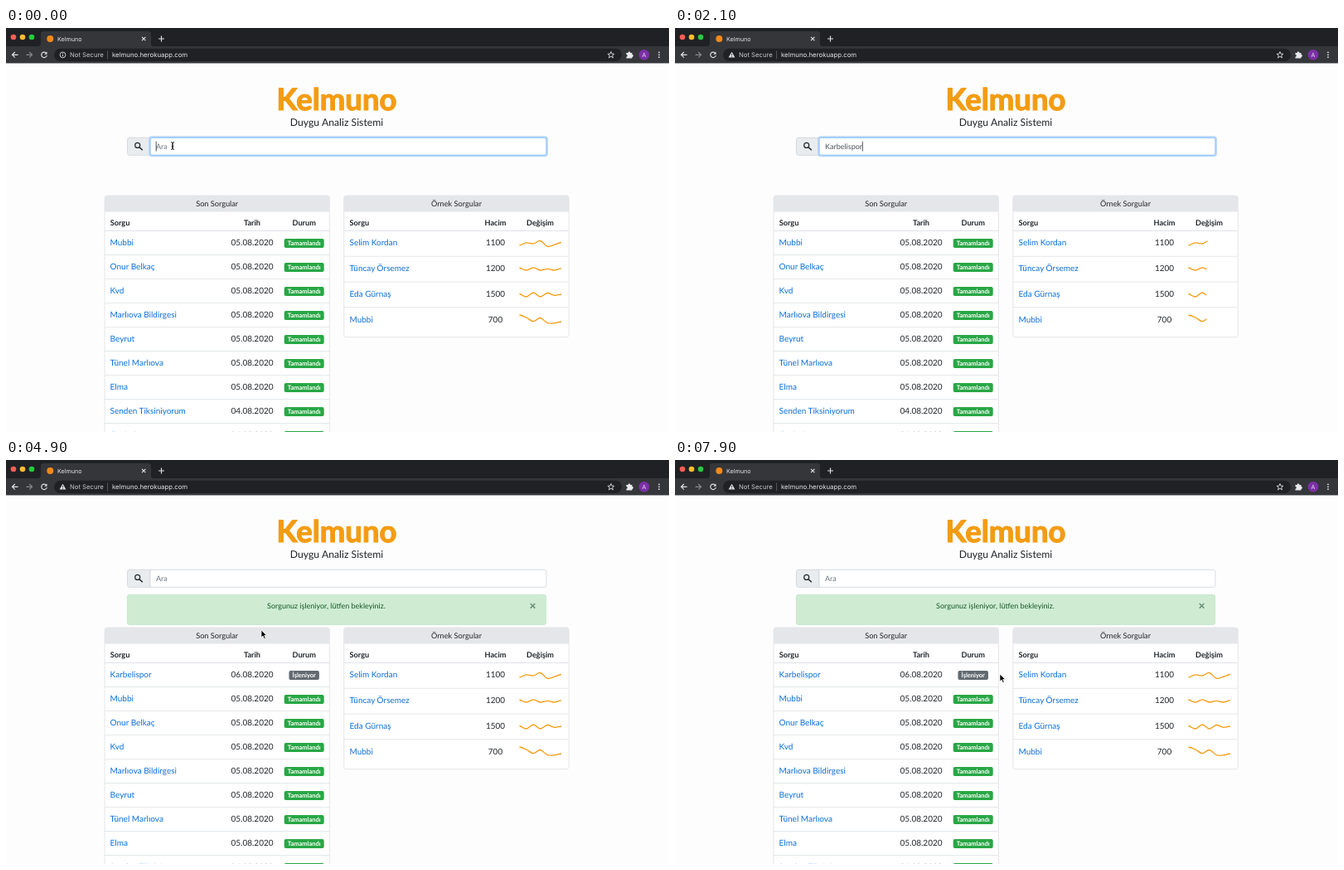
These frames come from a looping animation (800 by 487 pixels, 8000 ms). An HTML page:

```html
<!DOCTYPE html>
<html lang="tr">
<head>
<meta charset="utf-8">
<title>Kelmuno</title>
<style>
  html, body { margin: 0; width: 100%; height: 100%; overflow: hidden; background: #fdfdfd; }
  svg { display: block; }
  text { font-family: Lato, "Open Sans", sans-serif; font-size: 10px; fill: #212529; text-rendering: geometricPrecision; }
  .ui text { font-family: Inter, Roboto, sans-serif; font-size: 7.6px; fill: #e4e6e9; }
  .mid { text-anchor: middle; }
  text.small { font-size: 9.2px; }
  text.th { font-size: 9.2px; font-weight: 700; }
  text.link { fill: #0a6fdc; }
  text.badge { font-size: 7.5px; font-weight: 700; fill: #fff; text-anchor: middle; }
  text.field { font-size: 9px; fill: #495057; }
  .rule { stroke: #dee2e6; stroke-width: .8; }
  .icon { fill: none; stroke: #dfe1e5; stroke-width: 1.2; }
  .spark { fill: none; stroke: #f39c12; stroke-width: 1.3; }
</style>
</head>
<body>
<svg width="800" height="487" viewBox="0 0 800 487">
  <rect width="800" height="487" fill="#fdfdfd"/>

  <g class="ui">
    <rect width="800" height="42.5" fill="#35363a"/>
    <path d="M0 0H800V22H178Q175 22 175 18V7Q175 4 172 4H45Q42 4 42 7V18Q42 22 39 22H0Z" fill="#202124"/>
    <circle cx="9" cy="11" r="3.3" fill="#fe5f57"/>
    <circle cx="20" cy="11" r="3.3" fill="#febc2e"/>
    <circle cx="31" cy="11" r="3.3" fill="#28c840"/>
    <circle cx="53.3" cy="13" r="4" fill="#f08a1c"/>
    <text x="62" y="15.6" style="font-size:7.2px">Kelmuno</text>
    <path class="icon" d="M164 10.8l4.4 4.4m0-4.4l-4.4 4.4M184 13h7m-3.500-3.500v7"/>

    <path class="icon" d="M14.500 32.300H7.500m3.300-3.300L7.500 32.300l3.300 3.300"/>
    <path class="icon" style="stroke:#85878b" d="M24.500 32.300h7m-3.300-3.300l3.300 3.300l-3.300 3.300"/>
    <path class="icon" d="M48.800 30.500A3.300 3.300 0 1 0 49.300 33"/>
    <path d="M49.500 28.500v3.200h-3.200z" fill="#dfe1e5"/>

    <rect x="58" y="24.800" width="685" height="15.200" rx="7.600" fill="#202124"/>
    <g id="info" class="icon" style="stroke-width:.9">
      <circle cx="68.500" cy="32.400" r="3.400"/>
      <path d="M68.500 31.800v2.500m0-4.100v.9"/>
    </g>
    <g id="warn">
      <path d="M68.500 28.700l3.900 6.900h-7.800z" fill="#dfe1e5"/>
      <path d="M68.500 31v2.300m0 .7v.9" stroke="#202124" stroke-width=".8"/>
    </g>
    <text x="77" y="35.200" style="font-size:7.700px;fill:#c5c8cc">Not Secure</text>
    <path d="M122.500 27.500v10" stroke="#5f6368" stroke-width=".8"/>
    <text x="128" y="35.200" style="font-size:7.800px">kelmuno.herokuapp.com</text>

    <path class="icon" style="stroke-width:.9" d="M730 28.500l1.100 2.600 2.800.2-2.200 1.800.8 2.800-2.500-1.600-2.500 1.600.8-2.800-2.200-1.800 2.800-.2z"/>
    <path d="M748.500 30h2.100a1.400 1.400 0 0 1 2.800 0h2.100v2.100a1.400 1.400 0 0 1 0 2.800v1.600h-7v-1.800a1.300 1.300 0 0 0 0-2.600z" fill="#e8eaed"/>
    <circle cx="770" cy="32.300" r="6.300" fill="#7b2fa8"/>
    <text class="mid" x="770" y="34.900" style="font-size:7px">A</text>
    <g fill="#dfe1e5"><circle cx="788" cy="29.400" r=".9"/><circle cx="788" cy="32.300" r=".9"/><circle cx="788" cy="35.200" r=".9"/></g>
  </g>

  <text class="mid" x="399" y="98.800" style="font-size:36.500px;font-weight:700;fill:#f39c12;stroke:#f39c12;stroke-width:1.200px;stroke-linejoin:round">Kelmuno</text>
  <text class="mid" x="399" y="118" style="font-size:12.250px">Duygu Analiz Sistemi</text>

  <path d="M174 132.300H149q-2.500 0-2.500 2.500v16q0 2.500 2.500 2.500h25z" fill="#e9ecef" stroke="#ced4da" stroke-width=".8"/>
  <g fill="none" stroke="#212529"><circle cx="158.700" cy="141.400" r="3" stroke-width="1.200"/><path d="M161 143.700l3.800 3.600" stroke-width="1.500"/></g>
  <path d="M174 132.300h475.500q2.500 0 2.500 2.500v16q0 2.500-2.500 2.500H174z" fill="#fff" stroke="#ced4da" stroke-width=".8"/>
  <g id="ring" fill="none">
    <rect x="173" y="131.300" width="480" height="23" rx="3" stroke="#b9d9fb" stroke-width="2"/>
    <rect x="174" y="132.300" width="478" height="21" rx="2.500" stroke="#80bdff" stroke-width=".8"/>
  </g>
  <text id="hint" class="field" x="181" y="145.600" style="fill:#6c757d">Ara</text>
  <text id="query" class="field" x="181" y="145.600"></text>
  <path id="caret" d="M0 136.800v11.800" stroke="#212529" stroke-width=".8"/>

  <g id="alert">
    <rect x="146.400" y="162.400" width="505.200" height="36" rx="2.500" fill="#cfecd3" stroke="#c0e4c8" stroke-width=".8"/>
    <text class="mid" x="386.500" y="179" style="font-size:9px;fill:#155724">Sorgunuz işleniyor, lütfen bekleyiniz.</text>
    <path d="M632.800 173l5.600 5.600m0-5.600l-5.600 5.600" stroke="#6f8f78" stroke-width="1.500"/>
  </g>

  <g id="cards"></g>
  <g id="list"></g>
  <g id="samples"></g>

  <g id="arrow"><path d="M0 0v9l2.100-1.900 1.500 3.300 1.600-.7-1.500-3.200h2.800z" fill="#000" stroke="#fff" stroke-width=".7"/></g>
  <g id="beam" fill="none">
    <path id="beamPath" d="M-2-4.500q2 0 2 1.500v6q0 1.500-2 1.500M2-4.500q-2 0-2 1.500v6q0 1.500 2 1.500" stroke="#fff" stroke-width="2"/>
    <path d="M-2-4.500q2 0 2 1.500v6q0 1.500-2 1.500M2-4.500q-2 0-2 1.500v6q0 1.500 2 1.500M-1.200.8h2.400" stroke="#111" stroke-width=".9"/>
  </g>
</svg>

<script>
const $ = id => document.getElementById(id);
const LOOP = 8000, STEP = 100;
const WORD = 'Karbelispor';
const KEYS = [500, 600, 700, 800, 900, 1000, 1200, 1300, 1400, 1500, 1700];
const SUBMIT = 2150, ROW_IN = 3050, DRAW = 1500;
const ROW = 29;

const text = (x, y, cls, s) => `<text class="${cls}" x="${x}" y="${y}">${s}</text>`;
const rule = (x, y, w = .8) => `<path class="rule" style="stroke-width:${w}" d="M${x} ${y}h271"/>`;

function card(x, bottom, title, heads) {
  return `<rect x="${x}" y="202" width="271.400" height="${bottom - 202}" rx="3" fill="#fff" stroke="#dfe0e2" stroke-width=".8"/>
    <path d="M${x} 221.500V205q0-3 3-3h265.400q3 0 3 3v16.500z" fill="#e5e6ea"/>` +
    text(x + 135.700, 214.500, 'small mid', title) +
    text(x + 6.700, 238, 'th', heads[0]) +
    heads.slice(1).map(([cx, s]) => text(cx, 238, 'th mid', s)).join('') +
    rule(x, 244.500, 1.200);
}
$('cards').innerHTML =
  card(119, 520, 'Son Sorgular', ['Sorgu', [297, 'Tarih'], [359.700, 'Durum']]) +
  card(407.800, 372.700, 'Örnek Sorgular', ['Sorgu', [590.500, 'Hacim'], [644.500, 'Değişim']]);

function listRow(name, date, i) {
  const busy = i < 0, y = 259 + i * ROW, w = busy ? 36.500 : 48;
  return `<g ${busy ? 'id="fresh"' : ''}>` +
    (busy ? `<rect id="hover" x="119.400" y="${y - 14}" width="270.600" height="28.400" fill="#dff2fd"/>` : '') +
    text(125.600, y + 3.400, 'link', name) +
    text(297, y + 3.400, 'mid', date + '.08.2020') +
    `<rect x="${359.700 - w / 2}" y="${y - 4.900}" width="${w}" height="11" rx="2" fill="${busy ? '#626a71' : '#28a745'}"/>` +
    text(359.700, y + 3.300, 'badge', busy ? 'İşleniyor' : 'Tamamlandı') +
    rule(119, y + 14.500) + '</g>';
}
const names = ['Mubbi', 'Onur Belkaç', 'Kvd', 'Marlıova Bildirgesi', 'Beyrut',
  'Tünel Marlıova', 'Elma', 'Senden Tiksiniyorum', 'Geçinti'];
$('list').innerHTML = listRow(WORD, '06', -1) +
  names.map((n, i) => listRow(n, i < 7 ? '05' : '04', i)).join('');

// Catmull-Rom curve through evenly spaced heights
function curve(ys) {
  const dx = 50.500 / (ys.length - 1), X = i => 619.500 + i * dx;
  const at = i => ys[Math.max(0, Math.min(ys.length - 1, i))];
  let d = `M${X(0)} ${ys[0]}`;
  for (let i = 0; i < ys.length - 1; i++) {
    const a = at(i) + (at(i + 1) - at(i - 1)) / 6;
    const b = at(i + 1) - (at(i + 2) - at(i)) / 6;
    d += `C${X(i) + dx / 3} ${a} ${X(i + 1) - dx / 3} ${b} ${X(i + 1)} ${at(i + 1)}`;
  }
  return d;
}
const samples = [
  ['Selim Kordan', 1100, [262, 258.900, 260, 256.500, 263.300, 261.300, 258.500]],
  ['Tüncay Örsemez', 1200, [289, 292, 288.800, 292, 290.300, 292, 289.800]],
  ['Eda Gürnaş', 1500, [320.500, 324, 319, 324, 319.500, 322.300, 321]],
  ['Mubbi', 700, [346, 349, 353.700, 349.500, 355.500, 355.800, 354]]
];
$('samples').innerHTML = samples.map(([name, volume, ys], i) => {
  const y = 259 + i * 30.700;
  return text(414.500, y + 3.400, 'link', name) + text(590.500, y + 3.400, 'mid', volume) +
    `<path class="spark" pathLength="1" d="${curve(ys)}"/>` +
    (i < 3 ? rule(407.800, y + 16.300) : '');
}).join('');
const sparks = [...document.querySelectorAll('.spark')];

// CSS "ease" timing
function ease(p) {
  if (p >= 1) return 1;
  const bez = (a, b, u) => 3 * a * u * (1 - u) ** 2 + 3 * b * u * u * (1 - u) + u ** 3;
  let lo = 0, hi = 1;
  for (let i = 0; i < 20; i++) {
    const m = (lo + hi) / 2;
    if (bez(.25, .25, m) < p) lo = m; else hi = m;
  }
  return bez(.1, 1, lo);
}

// time, x, y of the pointer
const PATH = [
  [3600, 201, 142], [3900, 269, 164.500], [4300, 286, 181], [4900, 308, 205],
  [5300, 330, 246], [5600, 346, 262], [6200, 346, 262], [6700, 376, 260], [7200, 388, 258], [7500, 392, 258]
];
function pointer(t) {
  if (t < KEYS[0]) return [201, 142];
  if (t < PATH[0][0]) return null;
  const n = PATH.findIndex(p => p[0] > t);
  if (n < 0) return PATH[PATH.length - 1].slice(1);
  const [t0, x0, y0] = PATH[n - 1], [t1, x1, y1] = PATH[n];
  const k = (t - t0) / (t1 - t0);
  return [x0 + (x1 - x0) * k, y0 + (y1 - y0) * k];
}

const show = (id, on) => $(id).style.display = on ? '' : 'none';

function render(t) {
  const typed = KEYS.filter(k => k <= t).length;
  const sent = t >= SUBMIT, added = t >= ROW_IN;
  const query = sent ? '' : WORD.slice(0, typed);

  show('info', !typed);
  show('warn', typed);
  show('ring', !sent);
  show('caret', !sent);
  show('hint', !query);
  show('alert', sent);
  show('fresh', added);
  $('query').textContent = query;
  const w = query ? $('query').getComputedTextLength() : 0;
  $('caret').setAttribute('transform', `translate(${181.200 + w} 0)`);
  $('list').setAttribute('transform', `translate(0 ${added ? ROW : 0})`);

  // every update of the page restarts the line drawing
  const start = Math.max(-DRAW, ...[...KEYS, SUBMIT, ROW_IN].filter(k => k <= t));
  const drawn = ease((t - start) / DRAW);
  for (const s of sparks) {
    s.style.visibility = drawn > 0 ? 'visible' : 'hidden';
    s.style.strokeDasharray = drawn < 1 ? `${drawn} 2` : 'none';
  }

  const pos = pointer(t);
  let beam = false, over = false;
  if (pos) {
    const [x, y] = pos;
    over = y > 245 && y < 273 && x < 390;
    beam = (y > 132 && y < 153) || (over && x > 341 && x < 378);
    for (const id of ['arrow', 'beam']) $(id).setAttribute('transform', `translate(${x} ${y})`);
  }
  show('arrow', pos && !beam);
  show('beam', pos && beam);
  show('hover', over);
}

const begin = performance.now();
function tick() {
  const t = Math.max(0, performance.now() - begin) % LOOP;
  render(Math.floor(t / STEP) * STEP);
  requestAnimationFrame(tick);
}
tick();
</script>
</body>
</html>
```
